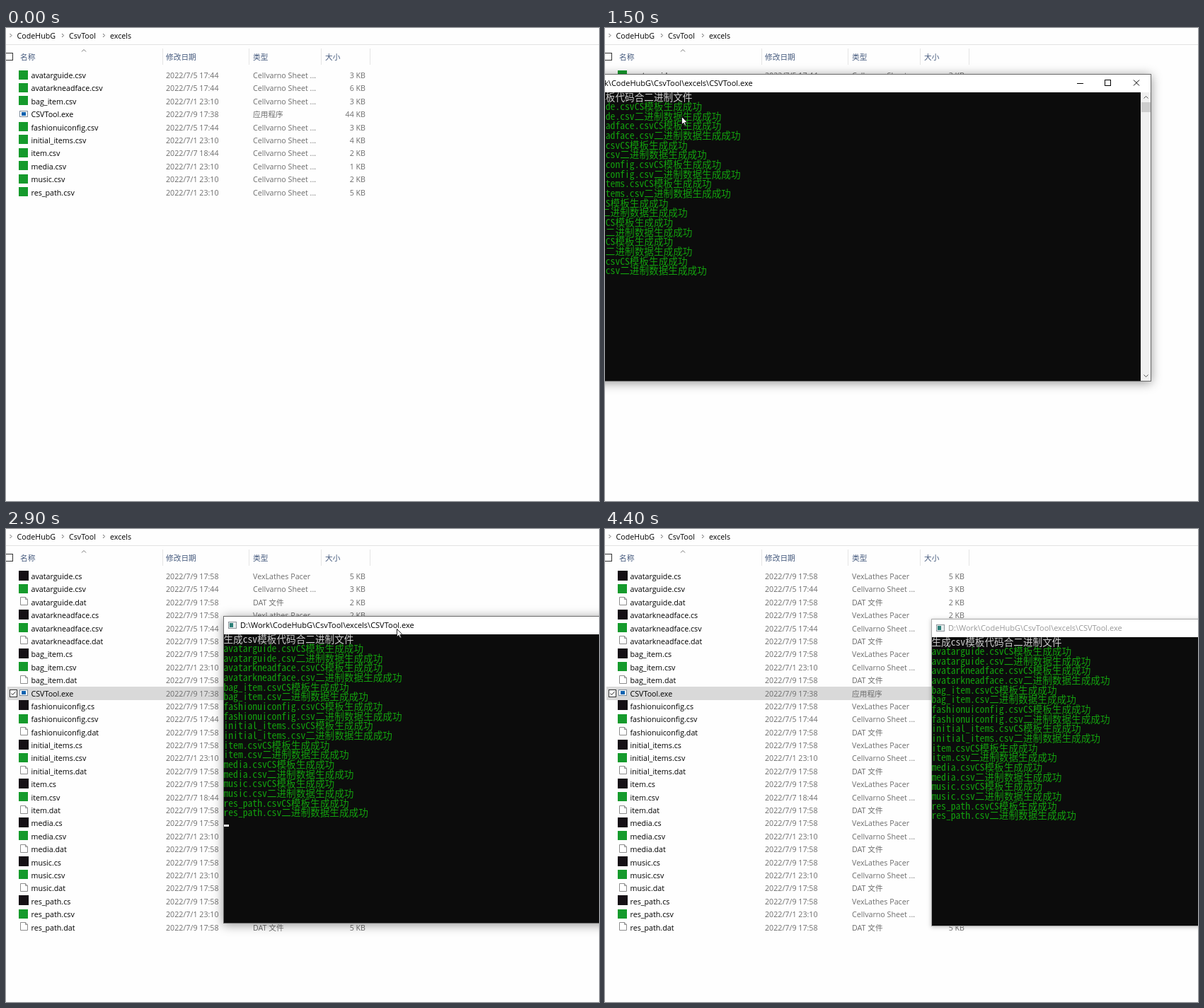
Write an HTML page with a canvas that moves like this. It is 838x669 px and loops after 4500 ms.

```html
<!DOCTYPE html>
<html lang="zh-CN">
<head>
<meta charset="utf-8">
<title>CSVTool</title>
<style>
html, body { margin: 0; width: 100%; height: 100%; overflow: hidden; background: #fefefe; }
canvas { display: block; }
</style>
</head>
<body>
<canvas id="stage" width="838" height="669"></canvas>
<script>
const ctx = document.getElementById('stage').getContext('2d');
const LOOP = 4500, STEP = 100, ROW = 18.39, LINE = 13.65;
const UI = '10.7px "Open Sans", "Noto Sans CJK SC", sans-serif';
const CAPTION = UI.replace('10.7', '11');
const MONO = '13.63px "Noto Sans Mono CJK SC", "Noto Sans CJK SC", monospace';
const WIN = { w: 833, h: 435, bar: 26 };

// name, csv date, sizes in KB of .cs, .csv and .dat
const tables = [
  ['avatarguide', '7/5 17:44', 5, 3, 2],
  ['avatarkneadface', '7/5 17:44', 2, 6, 6],
  ['bag_item', '7/1 23:10', 2, 3, 3],
  ['fashionuiconfig', '7/5 17:44', 3, 3, 3],
  ['initial_items', '7/1 23:10', 3, 4, 4],
  ['item', '7/7 18:44', 2, 2, 2],
  ['media', '7/1 23:10', 2, 1, 1],
  ['music', '7/1 23:10', 2, 2, 2],
  ['res_path', '7/1 23:10', 5, 5, 5],
];
const types = { cs: 'VexLathes Pacer', csv: 'Cellvarno Sheet ...', dat: 'DAT 文件', exe: '应用程序' };

function listFiles(generated) {
  const files = [], built = '7/9 17:58';
  const add = (name, ext, date, size) => files.push({ name, ext, date, size });
  for (const [name, date, cs, csv, dat] of tables) {
    if (generated) add(name, 'cs', built, cs);
    add(name, 'csv', date, csv);
    if (generated) add(name, 'dat', built, dat);
    if (name === 'bag_item') add('CSVTool', 'exe', '7/9 17:38', 44);
  }
  return files;
}
const before = listFiles(false), after = listFiles(true);

const log = ['生成csv模板代码合二进制文件'];
for (const [name] of tables) log.push(name + '.csvCS模板生成成功', name + '.csv二进制数据生成成功');

// time, x, y
const pointerPath = [
  [0, 850, 79], [100, 602, 79], [200, 455, 100], [300, 165, 130], [600, 108, 125], [1500, 108, 125],
  [1800, 154, 80], [1900, 154, 80], [2300, 368, 134], [2500, 433, 135], [2700, 465, 137],
  [2800, 465, 137], [2900, 552, 141], [3400, 702, 155], [3500, 706, 157], [3700, 676, 142],
  [3900, 760, 36], [4000, 850, 36],
];
const windowPath = [
  [1900, -61, 65], [2300, 150, 119], [2400, 180, 123], [2500, 213, 120], [2700, 250, 122],
  [2800, 250, 122], [2900, 307, 123], [3400, 490, 139], [3500, 493, 141], [3700, 461, 127],
];

function at(path, t) {
  const i = path.findIndex(key => key[0] > t);
  if (i < 0) return path[path.length - 1].slice(1);
  if (i === 0) return path[0].slice(1);
  const a = path[i - 1], b = path[i], k = (t - a[0]) / (b[0] - a[0]);
  return [1, 2].map(n => Math.round(a[n] + (b[n] - a[n]) * k));
}

function box(x, y, w, h, fill, line) {
  if (fill) { ctx.fillStyle = fill; ctx.fillRect(x, y, w, h); }
  if (line) { ctx.strokeStyle = line; ctx.strokeRect(x + .5, y + .5, w - 1, h - 1); }
}
function poly(points, line, fill) {
  ctx.beginPath();
  points.forEach(([x, y]) => ctx.lineTo(x, y));
  if (fill) { ctx.closePath(); ctx.fillStyle = fill; ctx.fill(); }
  ctx.strokeStyle = line;
  ctx.stroke();
}
function label(text, x, y, color, align = 'left', font = UI) {
  ctx.font = font;
  ctx.textAlign = align;
  ctx.fillStyle = color;
  ctx.fillText(text, x, y + 4);
}

function header() {
  const crumbs = [[15.5, 'CodeHubG'], [89, 'CsvTool'], [147, 'excels']];
  for (const [x, name] of crumbs) {
    poly([[x - 10, 8], [x - 7.5, 10.5], [x - 10, 13]], '#666');
    label(name, x, 11, '#000');
  }
  box(0, 23, 838, 1, '#e3e3e3');
  const columns = [[20, '名称', 221], [226, '修改日期', 343], [349, '类型', 445], [451, '大小', 514]];
  for (const [x, name, edge] of columns) {
    label(name, x, 40.5, '#43587c');
    box(edge, 29, 1, 23, '#e5e5e5');
  }
  poly([[107, 33.5], [110, 30.5], [113, 33.5]], '#777');
  box(-1, 35, 11, 11, '#fff', '#333');
}

function icon(ext, y) {
  if (ext === 'csv') box(18, y - 7, 13, 13, '#159a2c');
  else if (ext === 'cs') box(18, y - 8, 14, 14, '#151015');
  else if (ext === 'exe') {
    box(19, y - 5, 12, 9, '#fff', '#7d8b98');
    box(22, y - 3, 6, 5, '#0b62b0');
  } else {
    poly([[20.5, y - 6.5], [27.5, y - 6.5], [30.5, y - 3.5], [30.5, y + 4.5], [20.5, y + 4.5]], '#8c8c8c', '#fff');
    poly([[27.5, y - 6.5], [27.5, y - 3.5], [30.5, y - 3.5]], '#8c8c8c');
  }
}

function fileList(t) {
  const hover = t === 200 ? 1 : t >= 300 && t < 1000 ? 3 : -1;
  (t < 2000 ? before : after).forEach((file, i) => {
    const y = 67 + i * ROW, top = Math.floor(y), selected = t >= 1000 && file.ext === 'exe';
    if (selected) {
      if (t < 1300) box(2, top - 9, 509, 19, '#cce8ff', '#99d1ff');
      else box(2, top - 9, 509, 19, '#d9d9d9');
    } else if (i === hover) box(2, top - 9, 509, 19, '#e5f3ff');
    if (selected || i === hover) box(5, top - 5, 11, 11, '#fff', '#333');
    if (selected) poly([[7.5, top + .5], [9.5, top + 2.5], [13.5, top - 2]], '#222');
    icon(file.ext, top);
    label(`${file.name}.${file.ext}`, 35.5, y, '#000');
    label('2022/' + file.date, 226, y, '#6d6d6d');
    label(types[file.ext], 349, y, '#6d6d6d');
    label(file.size + ' KB', 508, y, '#6d6d6d', 'right');
  });
}

function consoleWindow(t) {
  const [x, y] = at(windowPath, t), { w, h, bar } = WIN, active = t < 4400;
  ctx.save();
  if (t < 1400) {
    ctx.globalAlpha = .6;
    ctx.translate(x + w / 2, y + h / 2);
    ctx.scale(.95, .95);
    ctx.translate(-x - w / 2, -y - h / 2);
  }
  ctx.save();
  ctx.shadowColor = active ? 'rgba(0,0,0,.42)' : 'rgba(0,0,0,.25)';
  ctx.shadowBlur = active ? 14 : 6;
  ctx.shadowOffsetY = active ? 2 : 1;
  box(x, y, w, h, '#fff');
  ctx.restore();
  box(x, y + bar, w - 15, h - bar, '#0c0c0c');
  box(x + w - 15, y + bar, 15, h - bar, '#f0f0f0');
  box(x + w - 14, y + 40, 13, 14, '#cdcdcd');
  const mid = x + w - 7.5;
  poly([[mid - 3, y + 34.5], [mid, y + 31.5], [mid + 3, y + 34.5]], '#505050');
  poly([[mid - 3, y + 425.5], [mid, y + 428.5], [mid + 3, y + 425.5]], '#505050');
  box(x, y, w, h, null, active ? '#6b6b6b' : '#aaa');

  const ink = active ? '#000' : '#999';
  box(x + 7, y + 8, 12, 10, '#e8eeee', '#8b9399');
  box(x + 9, y + 10, 5, 6, '#2b7f78');
  label('D:\\Work\\CodeHubG\\CsvTool\\excels\\CSVTool.exe', x + 24, y + 13, ink, 'left', CAPTION);
  box(x + 728, y + 13, 9, 1, ink);
  box(x + 767, y + 8, 9, 9, null, ink);
  poly([[x + 808, y + 8.5], [x + 816, y + 16.5]], ink);
  poly([[x + 816, y + 8.5], [x + 808, y + 16.5]], ink);

  const shown = t < 1400 ? 0 : t < 1500 ? 7 : log.length;
  ctx.font = MONO;
  log.slice(0, shown).forEach((text, i) => {
    ctx.fillStyle = i ? '#13a10e' : '#ccc';
    ctx.fillText(text, x + .5, y + 37.5 + i * LINE);
  });
  if ((t - 1450) % 1060 < 530) box(x + 1, y + 295, 7, 3, '#f2f2f2');
  ctx.restore();
}

function pointer(t) {
  const [x, y] = at(pointerPath, t);
  const shape = [[0, 0], [0, 11], [2.5, 8.7], [4.3, 12.6], [6, 11.9], [4.3, 8], [7.8, 8]];
  poly(shape.map(([dx, dy]) => [x + dx + .5, y + dy + .5]), '#222', '#fff');
}

function draw(now) {
  const t = Math.floor(now % LOOP / STEP) * STEP;
  ctx.lineWidth = 1;
  box(0, 0, 838, 669, '#fefefe');
  header();
  fileList(t);
  if (t >= 1300) consoleWindow(t);
  pointer(t);
}

let start;
function tick(now) {
  start ??= now;
  draw(now - start);
  requestAnimationFrame(tick);
}
requestAnimationFrame(tick);
</script>
</body>
</html>
```
